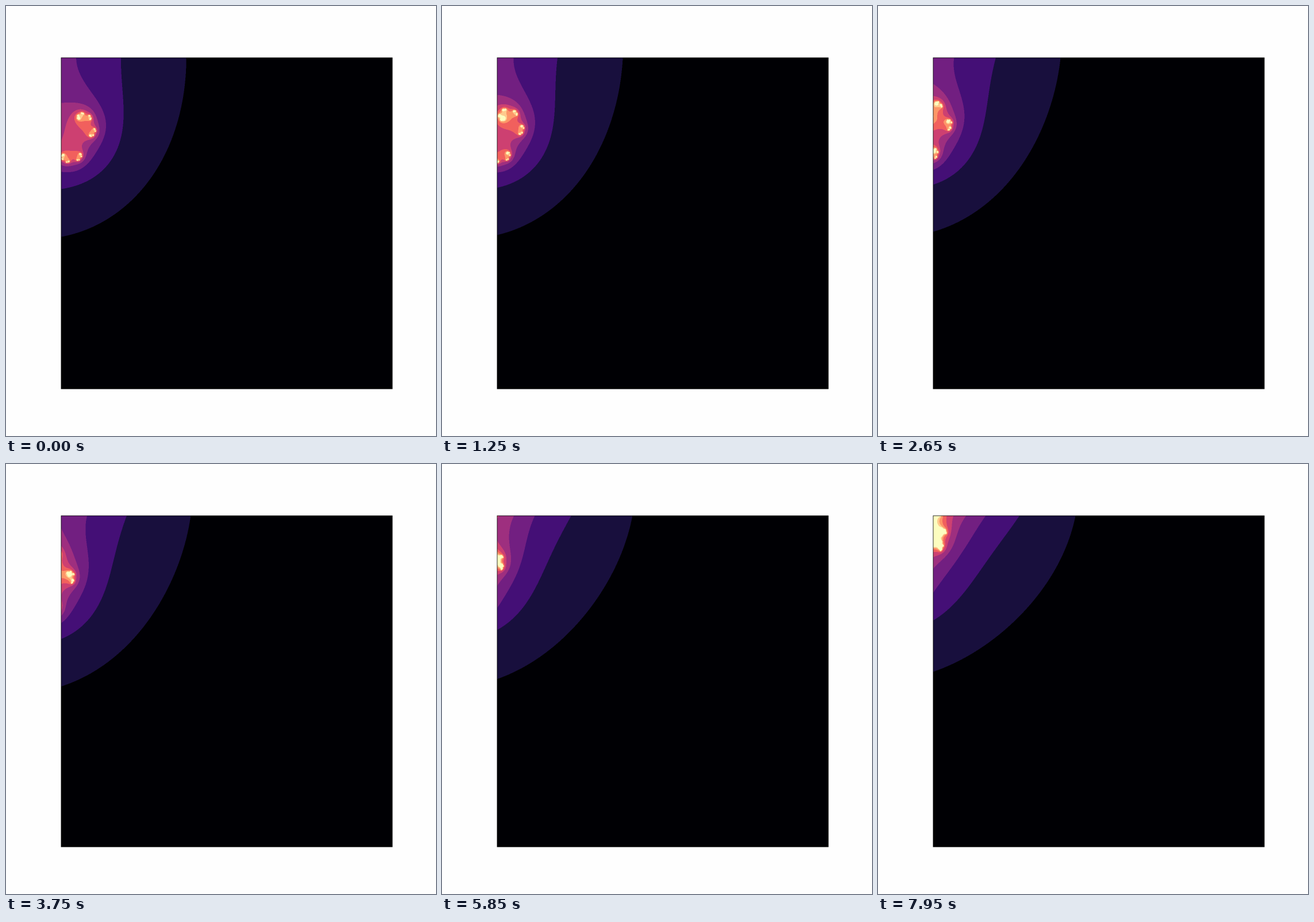
An HTML page with a canvas that plays this animation: 748x748 px, repeating every 8 s.

```html
<!DOCTYPE html>
<html lang="en">
<head>
<meta charset="utf-8">
<title>Julia set</title>
<style>
  html, body { margin: 0; width: 100%; height: 100%; overflow: hidden; background: #fefefe; }
  canvas { display: block; width: 748px; height: 748px; }
</style>
</head>
<body>
<canvas id="stage" width="748" height="748"></canvas>
<script>
const ctx = document.getElementById('stage').getContext('2d');

const LOOP = 8000, STEP = 50;
const BOX = { x: 96, y: 90, size: 576 };
const ORIGIN = { x: 55.6, y: 90 };   // where z = 0 lies on the stage
const SCALE = 144;                   // pixels per unit
const RADIUS = 0.7885;               // |c|
const TURN = 2 * Math.PI / 599;      // angle of c per step
const MAX = 9;
const W = 256, H = 320;              // beyond this area every point escapes at once
const OFFSETS = [0.25, 0.75];

const MAGMA = ['000004', '180f3d', '440f76', '721f81', '9e2f7f',
  'cd4071', 'f1605d', 'fd9668', 'feca8d', 'fcfdbf']
  .map(hex => [0, 2, 4].map(i => parseInt(hex.substr(i, 2), 16)));

// Colours for the sum of four samples, 0 to 4 * MAX
const LUT = Array.from({ length: 4 * MAX + 1 }, (_, sum) => {
  const low = Math.floor(sum / 4), high = Math.min(low + 1, MAX);
  const mix = sum / 4 - low;
  return MAGMA[low].map((v, k) => Math.round(v + (MAGMA[high][k] - v) * mix));
});

function level(x, y, cx, cy) {
  for (let i = 0; i < MAX; i++) {
    const re = x * x - y * y + cx;
    y = 2 * x * y + cy;
    x = re;
    if (x * x + y * y > 16) return i;
  }
  return MAX;
}

const image = ctx.createImageData(W, H);

function draw(step) {
  const cx = RADIUS * Math.cos(step * TURN);
  const cy = RADIUS * Math.sin(step * TURN);
  const data = image.data;
  let at = 0;
  for (let row = 0; row < H; row++) {
    for (let col = 0; col < W; col++) {
      let sum = 0;
      for (const dy of OFFSETS) {
        const y = (BOX.y + row + dy - ORIGIN.y) / SCALE;
        for (const dx of OFFSETS) {
          sum += level((BOX.x + col + dx - ORIGIN.x) / SCALE, y, cx, cy);
        }
      }
      const color = LUT[sum];
      data[at++] = color[0];
      data[at++] = color[1];
      data[at++] = color[2];
      data[at++] = 255;
    }
  }

  ctx.fillStyle = '#fefefe';
  ctx.fillRect(0, 0, 748, 748);
  ctx.fillStyle = '#000004';
  ctx.fillRect(BOX.x, BOX.y, BOX.size, BOX.size);
  ctx.putImageData(image, BOX.x, BOX.y);
  ctx.strokeStyle = '#000';
  ctx.lineWidth = 0.8;
  ctx.strokeRect(BOX.x, BOX.y, BOX.size, BOX.size);
}

const start = performance.now();
let shown = -1;

function tick() {
  const step = Math.floor((performance.now() - start) % LOOP / STEP);
  if (step !== shown) draw(shown = step);
  requestAnimationFrame(tick);
}
tick();
</script>
</body>
</html>
```
